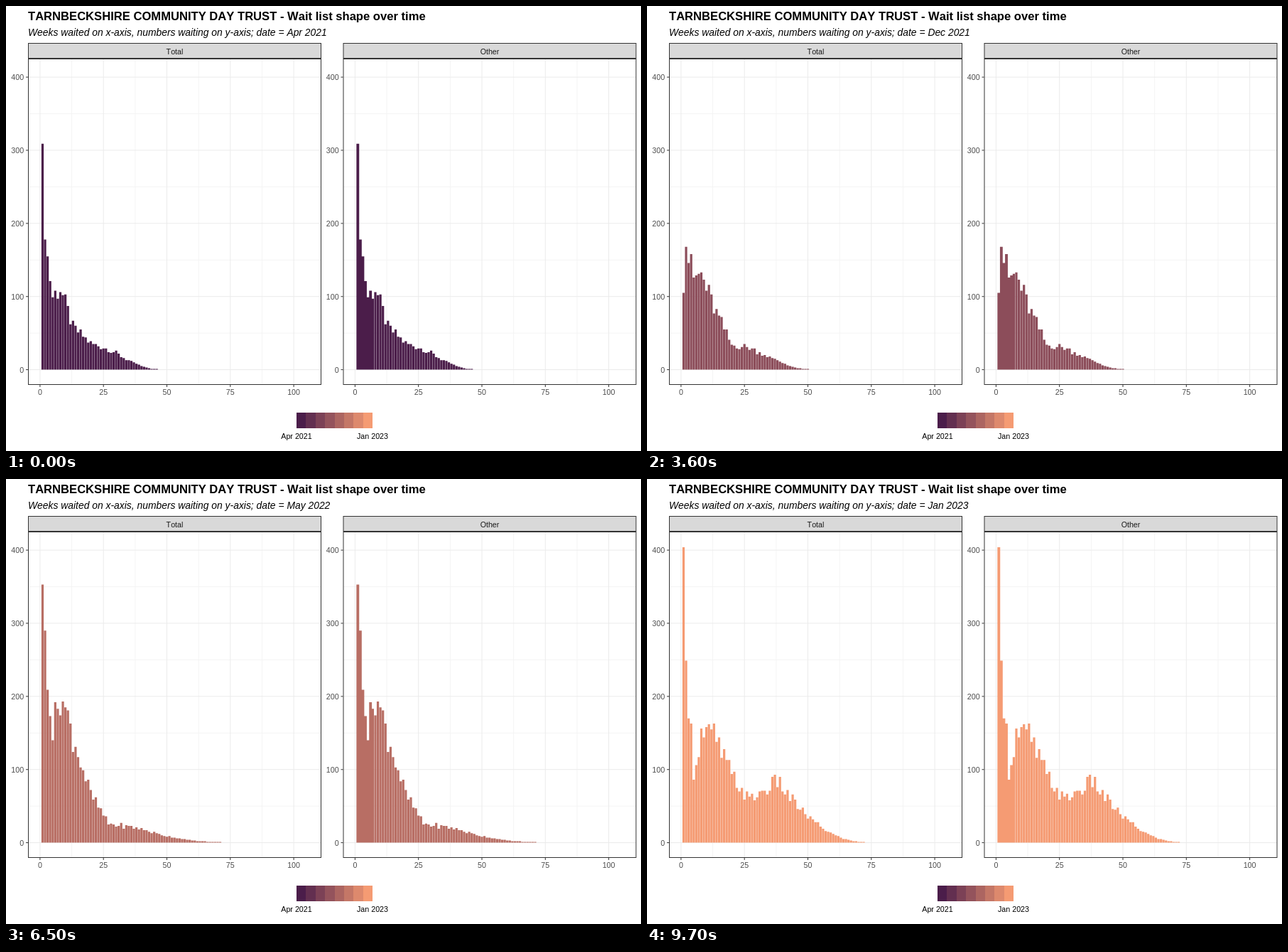
These frames come from a looping animation (894x626 px, 10000 ms). An HTML page:

```html
<!DOCTYPE html>
<html lang="en">
<head>
<meta charset="utf-8">
<title>Wait list shape over time</title>
<style>
  html, body { margin: 0; width: 100%; height: 100%; overflow: hidden; background: #fff; }
  svg { display: block; width: 894px; height: 626px; }
  text {
    font: 10.7px "Liberation Sans", Arial, sans-serif;
    font-kerning: none;
    fill: #000;
    white-space: pre;
  }
  .title { font-size: 16.6px; font-weight: bold; }
  .subtitle { font-size: 13.88px; font-style: italic; }
  .axis { fill: #4d4d4d; }
  .strip { fill: #1a1a1a; }
</style>
</head>
<body>
<svg id="chart" viewBox="0 0 894 626"></svg>
<script>
const LOOP = 10000, TWEEN = 100;
const WEEK = 3.572, UNIT = 1.0288, BASE = 511.6, MAX_WEEK = 75;
const MONTHS = ["Jan", "Feb", "Mar", "Apr", "May", "Jun", "Jul", "Aug", "Sep", "Oct", "Nov", "Dec"];
const FIRST = [75, 29, 74], LAST = [245, 155, 115];

// Each shape runs through a few heights, then eases out to its end week.
const KNOTS = [1, 2, 5, 8, 13, 20, 27, 38];
const SHAPES = [
  { at: 0, end: 46, heights: [309, 178, 100, 112, 58, 36, 28, 7] },
  { at: 3, end: 44, heights: [246, 150, 159, 145, 70, 38, 16, 5] },
  { at: 7, end: 50, heights: [105, 168, 125, 130, 85, 34, 30, 12] },
  { at: 9.5, end: 61, heights: [238, 222, 189, 140, 48, 58, 26, 19] },
  { at: 12.5, end: 71, heights: [353, 290, 150, 205, 145, 66, 26, 20] },
  { at: 17, end: 68, heights: [229, 211, 165, 138, 152, 150, 82, 32] },
  { at: 20, end: 72, heights: [404, 249, 98, 148, 146, 92, 58, 84] }
];

const svg = document.getElementById("chart");
const lerp = (a, b, k) => a + (b - a) * k;
const mixColor = k => `rgb(${FIRST.map((c, i) => Math.round(lerp(c, LAST[i], k)))})`;

function add(tag, attrs, text = "") {
  const node = document.createElementNS("http://www.w3.org/2000/svg", tag);
  for (const name in attrs) node.setAttribute(name, attrs[name]);
  node.textContent = text;
  return svg.appendChild(node);
}
const label = (x, y, text, cls = "", anchor = "middle") =>
  add("text", { x, y, class: cls, "text-anchor": anchor }, text);
const box = (x, y, width, height, fill, stroke = "none") =>
  add("rect", { x, y, width, height, fill, stroke });
const line = (d, stroke) => add("path", { d, stroke, fill: "none" });

function jitter(week, seed) {
  const s = Math.sin(week * 12.9898 + seed * 78.233) * 43758.5453;
  return 0.85 + 0.3 * (s - Math.floor(s));
}

function sampleShape({ heights, end }, week, seed) {
  if (week > end) return 0;
  const rough = week > 2 ? jitter(week, seed) : 1;
  const i = KNOTS.findLastIndex(w => w <= week);
  if (i === KNOTS.length - 1) {
    const left = (end - week) / (end - KNOTS[i]);
    return 1 + heights[i] * left ** 2 * rough;
  }
  const k = (week - KNOTS[i]) / (KNOTS[i + 1] - KNOTS[i]);
  return lerp(heights[i], heights[i + 1], k) * rough;
}
const curves = SHAPES.map((shape, seed) =>
  Array.from({ length: MAX_WEEK }, (_, i) => sampleShape(shape, i + 1, seed)));

function heightsAt(pos) {
  const i = Math.max(1, SHAPES.findIndex(s => s.at >= pos));
  const from = SHAPES[i - 1].at, k = (pos - from) / (SHAPES[i].at - from);
  return curves[i].map((v, w) => Math.round(lerp(curves[i - 1][w], v, k)));
}

function makePanel(name, left, joined) {
  const width = 412, zero = left + 16.4;
  const px = week => zero + week * WEEK;
  const py = value => BASE - value * UNIT;
  const grid = (week, value, color) =>
    line(`M${px(week)} 74V532M${left} ${py(value)}h${width}`, color);

  for (let i = 0; i < 4; i++) grid(12.5 + 25 * i, 50 + 100 * i, "#f4f4f4");
  for (let i = 0; i < 5; i++) grid(25 * i, 100 * i, "#ebebeb");
  const bars = add("path", {});
  box(left, 74.5, width, 458, "none", "#333");
  box(left, 52.5, width, 21, "#d9d9d9", "#333");
  label(left + width / 2, 67.6, name, "strip");
  for (let i = 0; i < 5; i++) {
    line(`M${px(25 * i)} 533v3M${left - 3.5} ${py(100 * i)}h3`, "#333");
    label(px(25 * i), 547.3, 25 * i, "axis");
    label(left - 6.3, py(100 * i) + 4, 100 * i, "axis", "end");
  }
  return (heights, color) => {
    bars.setAttribute("fill", color);
    bars.setAttribute("d", heights.map((v, i) => {
      if (v < 1) return "";
      const barWidth = i < joined ? WEEK + 0.3 : WEEK * 0.9;
      return `M${px(i + 0.55)} ${BASE}V${py(v)}h${barWidth}V${BASE}z`;
    }).join(""));
  };
}

label(31, 20, "TARNBECKSHIRE COMMUNITY DAY TRUST - Wait list shape over time", "title", "start");
const subtitle = label(31, 42, "", "subtitle", "start");
const panels = [makePanel("Total", 31.5, 0), makePanel("Other", 475, 6)];
for (let i = 0; i < 8; i++) {
  box(409 + i * 13.375, 572, 13.4, 22, mixColor(i / 7)).setAttribute("shape-rendering", "crispEdges");
}
label(409, 609, "Apr 2021");
label(516, 609, "Jan 2023");

// One month has no entry, so later steps move on by one.
const monthOf = step => step + (step >= 7 ? 1 : 0);

function poseAt(t) {
  const late = t >= 8000;
  const span = late ? 400 : 500, origin = late ? 8000 : 0;
  const count = Math.floor((t - origin) / span);
  const step = count + (late ? 16 : 0);
  const between = step > 0 && t - origin - count * span < TWEEN;
  return between ? step - 0.5 : step;
}

function render(pos) {
  const before = monthOf(Math.floor(pos)), after = monthOf(Math.ceil(pos));
  const named = before + 3;
  const date = `${MONTHS[named % 12]} ${2021 + Math.floor(named / 12)}`;
  subtitle.textContent = `Weeks waited on x-axis, numbers waiting on y-axis; date = ${date}`;
  const heights = heightsAt(pos), color = mixColor((before + after) / 42);
  panels.forEach(paint => paint(heights, color));
}

let shown = -1;
function tick() {
  const pos = poseAt(performance.now() % LOOP);
  if (pos !== shown) render(shown = pos);
  requestAnimationFrame(tick);
}
tick();
</script>
</body>
</html>
```
